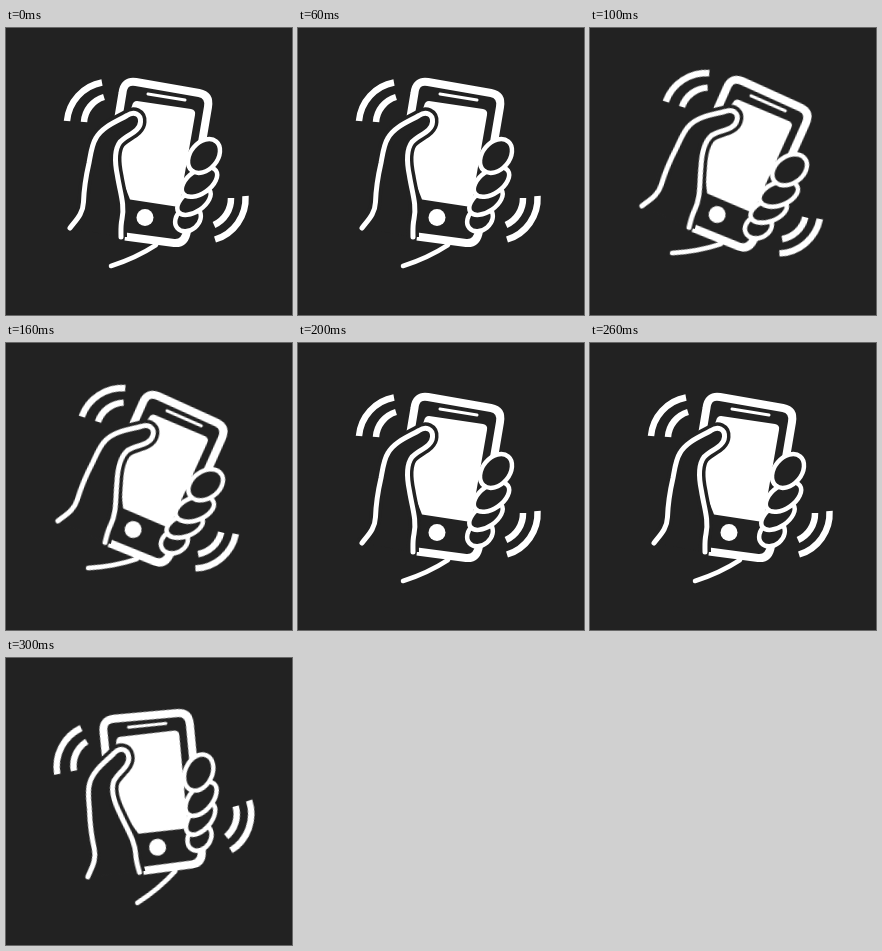
These frames come from a looping animation (286 px wide and 287 px high, 0.4 s). An HTML page:

```html
<!DOCTYPE html>
<html lang="en">
<head>
<meta charset="utf-8">
<title>Shaking phone</title>
<style>
  html, body { margin: 0; width: 100%; height: 100%; overflow: hidden; background: #222; }
  svg { display: block; width: 286px; height: 287px; }
  #shaker {
    transform-origin: 144.5px 141.5px;
    animation: shake 400ms step-end infinite;
  }
  @keyframes shake {
    0%, 50% { transform: rotate(0deg); }
    25% { transform: rotate(14.5deg); }
    75%, 100% { transform: rotate(-15deg); }
  }
  .line { fill: none; stroke: #fff; stroke-width: 5; stroke-linecap: round; stroke-linejoin: round; }
  .wave { fill: none; stroke: #fff; stroke-width: 6.5; }
  .body { fill: #222; stroke: #fff; stroke-width: 8; }
  .finger { fill: #222; stroke: #fff; stroke-width: 4.5; }
  .halo { fill: #222; stroke: #222; stroke-width: 12; stroke-linejoin: round; }
  .white { fill: #fff; }
</style>
</head>
<body>
<svg viewBox="0 0 286 287">
  <defs>
    <path id="thumb" d="M64 200C70 192 77 186 77.500 174C78 160 80 148 83 135C85 124 86 116 90 110C97 98 112 93 121 87.500C128 83 135 86 134.500 94C134 104 120 107 114 114C108 122 109 136 111.500 148C114 164 119 177 116 191C114.500 198 115 203 115 209"/>
  </defs>
  <g id="shaker">
    <!-- motion waves -->
    <path class="wave" d="M96 54.500A43 43 0 0 0 61 93M98 69A28 28 0 0 0 78 94"/>
    <path class="wave" d="M239.500 168A43 43 0 0 1 209 211.500M225 170A29 29 0 0 1 208 197"/>

    <!-- phone -->
    <path class="line" style="stroke-width:4.500" d="M105 238Q130 230 150 217"/>
    <path class="body" d="M112 92L116.500 65Q118 52 130 54L193 65Q204 67 202 79L181 203Q179 216 168 215L119 208.500"/>
    <path class="line" style="stroke-width:3" d="M142 66L179 72"/>
    <path class="white" d="M131 73L185 81Q190 82 189 87L173 179L124 171.500L106 125L126 78Q127 73 131 73Z"/>
    <circle class="white" cx="139" cy="189.500" r="8.500"/>

    <!-- hand -->
    <use href="#thumb" class="halo"/>
    <use href="#thumb" class="line"/>
    <ellipse class="finger" rx="14" ry="11" transform="translate(182 191) rotate(-40)"/>
    <ellipse class="finger" rx="19" ry="10.500" transform="translate(188 173) rotate(-35)"/>
    <ellipse class="finger" rx="20" ry="11.500" transform="translate(193.500 154) rotate(-35)"/>
    <ellipse class="finger" rx="19" ry="13.500" transform="translate(198 128) rotate(-50)"/>
  </g>
</svg>
</body>
</html>
```
